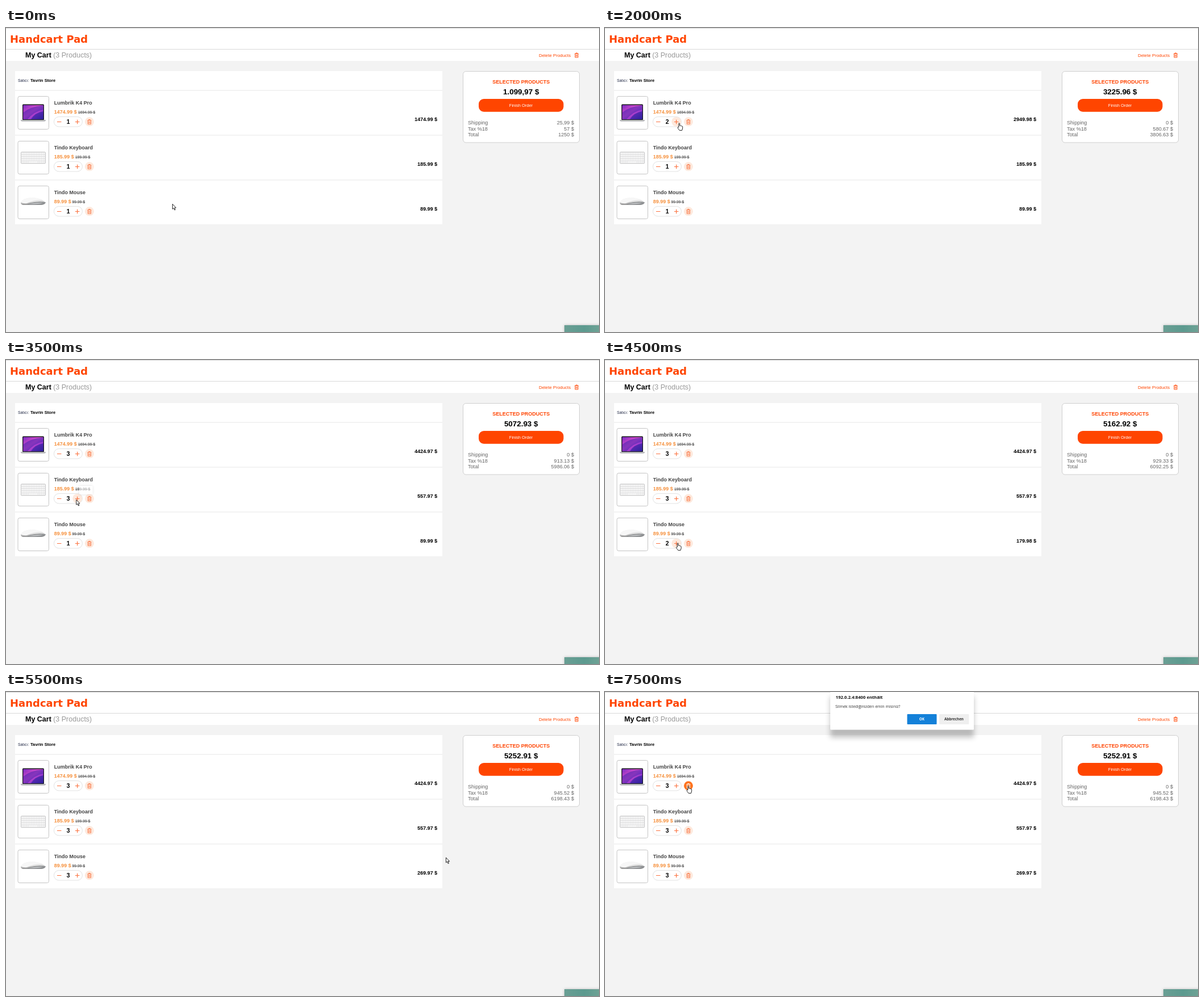
These frames come from a looping animation (1045x536 px, 8000 ms). An HTML page:

```html
<!DOCTYPE html>
<html lang="en">
<head>
<meta charset="utf-8">
<title>Shopping cart</title>
<style>
  html, body { margin: 0; width: 100%; height: 100%; overflow: hidden; background: #f3f3f3; }
  svg { display: block; width: 1045px; height: 536px; font-family: "Liberation Sans", Arial, sans-serif; }
  .bold { font-weight: 700; }
  .mid { text-anchor: middle; }
  .end { text-anchor: end; }
  .brand { font: 700 18px "DejaVu Sans", Verdana, sans-serif; }
  .dialog text { font-family: "Open Sans", "Noto Sans", sans-serif; }
  .old { text-decoration: line-through; }
  .line { fill: none; stroke-width: 1.2; }
</style>
</head>
<body>
<svg id="stage" viewBox="0 0 1045 536">
  <defs>
    <linearGradient id="screen" x1="0" y1="0" x2="1" y2="1">
      <stop offset="0" stop-color="#7a2bc4"/><stop offset=".45" stop-color="#e04fc8"/>
      <stop offset=".7" stop-color="#8a35cf"/><stop offset="1" stop-color="#2b2a9c"/>
    </linearGradient>
    <linearGradient id="shell" x1="0" y1="0" x2="0" y2="1">
      <stop offset="0" stop-color="#f4f4f4"/><stop offset=".6" stop-color="#dcdcdc"/><stop offset="1" stop-color="#8c8c8c"/>
    </linearGradient>
    <linearGradient id="teal">
      <stop offset="0" stop-color="#6a9f94"/><stop offset=".5" stop-color="#5c9a8f"/><stop offset="1" stop-color="#74a597"/>
    </linearGradient>
    <filter id="shade" x="-20%" y="-30%" width="140%" height="190%">
      <feDropShadow dx="0" dy="14" stdDeviation="5" flood-opacity=".24"/>
    </filter>
    <filter id="soft" x="-30%" y="-50%" width="160%" height="200%">
      <feDropShadow dx="0" dy="0" stdDeviation="2" flood-opacity=".25"/>
    </filter>
  </defs>
</svg>
<script>
const ORANGE = '#ff4500', PALE = '#fde9dd', ICON = '#fb7240';
const STEP = 500, LOOP = 8000, ROW_HEIGHT = 79;
const stage = document.getElementById('stage');

function add(parent, tag, attrs, content) {
  const node = document.createElementNS('http://www.w3.org/2000/svg', tag);
  for (const key in attrs) node.setAttribute(key, attrs[key]);
  if (content !== undefined) node.textContent = content;
  parent.appendChild(node);
  return node;
}
const rect = (parent, x, y, width, height, fill, more = {}) =>
  add(parent, 'rect', { x, y, width, height, fill, ...more });
const path = (parent, d, more = {}) => add(parent, 'path', { d, ...more });
const text = (parent, x, y, size, fill, content, style = '') =>
  add(parent, 'text', { x, y, fill, class: style, 'font-size': size }, content);
const group = (parent, transform = '', more = {}) => add(parent, 'g', { transform, ...more });
const show = (node, on) => node.setAttribute('visibility', on ? 'visible' : 'hidden');

function trash(parent, x, y, color) {
  return path(group(parent, `translate(${x} ${y})`),
    'M-3.5-2.6H3.5M-1.3-2.8V-4H1.3V-2.8M-2.6-2.4V3.9H2.6V-2.4M-.9-.8V2.4M.9-.8V2.4',
    { fill: 'none', stroke: color, 'stroke-width': .9 });
}

function drawLaptop(g) {
  rect(g, 29, 134.5, 38, 28, '#17171c', { rx: 1.5 });
  rect(g, 30.3, 136, 35.4, 25, 'url(#screen)');
  path(g, 'M30.3 149Q42 139 65.7 136V144Q50 147 38 161H30.3Z', { fill: '#4b26b4', opacity: .6 });
  path(g, 'M44 161Q51 149 65.7 147V161Z', { fill: '#31219c', opacity: .65 });
  path(g, 'M26 162H70V163.4Q69 164.8 67 164.8H29Q27 164.8 26 163.4Z', { fill: '#b7b8bb' });
}

function drawKeyboard(g) {
  rect(g, 26.3, 139.5, 43.4, 20.5, '#d5d5d6', { rx: 1.5, stroke: '#c2c2c2', 'stroke-width': .6 });
  for (let row = 0; row < 5; row++) {
    for (let col = 0; col < 14; col++) {
      const wide = row === 4 && col > 3 && col < 9;
      rect(g, 27.4 + col * 2.97, 140.6 + row * 3.8, wide ? 3 : 2.4, 3, '#fbfbfb');
    }
  }
}

function drawMouse(g) {
  path(g, 'M26 150Q29 142 44 141Q60 141 70 149.5Q69 153 62 154H30Q26 153 26 150Z', { fill: 'url(#shell)' });
  path(g, 'M26 149Q30 142 44 141Q57 141 64 145Q48 145 37 151Q30 152 26 149Z', { fill: '#f7f7f7' });
  path(g, 'M36 153.7Q43 149 57 148.4Q67 148.2 70 149.5Q68 154 60 154Z', { fill: '#8f9193' });
  path(g, 'M40 152.6Q50 149.5 65 150Q58 152.8 40 152.6Z', { fill: '#c4c6c8' });
}

const products = [
  { name: 'Lumbrik K4 Pro', price: 1474.99, old: 1694.99, oldX: 127, draw: drawLaptop },
  { name: 'Tindo Keyboard', price: 185.99, old: 199.99, oldX: 122, draw: drawKeyboard },
  { name: 'Tindo Mouse', price: 89.99, old: 99.99, oldX: 116.6, draw: drawMouse },
];
const money = value => value.toFixed(2) + ' $';

// Page header
rect(stage, 0, 0, 1045, 58, '#fff');
rect(stage, 0, 0, 1045, 1, '#d9d9d9');
rect(stage, 0, 37, 1045, 1, '#d9d9d9');
text(stage, 7, 26, 18, ORANGE, 'Handcart Pad', 'brand');
text(stage, 34, 52, 12.5, '#000', 'My Cart', 'bold');
text(stage, 83.2, 52, 12.5, '#999', '(3 Products)');
text(stage, 939, 51, 7.9, ORANGE, 'Delete Products');
trash(stage, 1005.5, 48, ORANGE);

// Product list
rect(stage, 16, 76, 753, 33, '#fff');
text(stage, 21, 95, 6.8, '#1c2340', 'Satıcı:');
text(stage, 43, 95, 7.7, '#000', 'Tavrin Store', 'bold');

const rows = products.map((product, i) => {
  const g = group(stage, `translate(0 ${i * ROW_HEIGHT})`);
  rect(g, 16, 111, 753, 77, '#fff');
  rect(g, 21, 120.5, 54.5, 58, '#fff', { rx: 3, stroke: '#c4c4c4' });
  product.draw(g);
  text(g, 84.7, 135.3, 9, '#444', product.name, 'bold');
  text(g, 84.7, 151, 9, '#f6923f', money(product.price), 'bold');
  text(g, product.oldX, 151, 6.8, '#444', money(product.old), 'old');
  rect(g, 84.5, 156.5, 50, 17.5, '#fff', { rx: 8.7, stroke: '#e2e2e2' });
  const plusHover = add(g, 'circle', { cx: 125.7, cy: 165.3, r: 8.4, fill: PALE });
  path(g, 'M90 165.5H97.5M122 165.5H129.5M125.7 161.7V169.3', { class: 'line', stroke: ICON });
  const quantity = text(g, 109.7, 169, 10.5, '#000', 1, 'bold mid');
  const bin = add(g, 'circle', { cx: 147, cy: 165.3, r: 8, fill: PALE });
  const binIcon = trash(g, 147, 165.5, ICON);
  const amount = text(g, 760, 164, 9, '#000', '', 'bold end');
  return { plusHover, quantity, bin, binIcon, amount };
});

// Summary card
rect(stage, 805.5, 76.5, 205, 125.5, '#fff', { rx: 5, stroke: '#cfcfcf' });
text(stage, 907.7, 98, 9, ORANGE, 'SELECTED PRODUCTS', 'bold mid');
const subtotal = text(stage, 907.7, 117.4, 13.4, '#000', '', 'bold mid');
rect(stage, 833, 125, 149.5, 22.7, ORANGE, { rx: 9 });
text(stage, 907.5, 139, 7.5, '#fff', 'Finish Order', 'mid');
const costs = ['Shipping', 'Tax %18', 'Total'].map((label, i) => {
  const y = 170.4 + i * 10.2;
  text(stage, 814, y, 9.1, '#666', label);
  return text(stage, 1001, y, 9.1, '#666', '', 'end');
});

rect(stage, 984, 524, 70, 20, 'url(#teal)', { filter: 'url(#soft)' });

const hint = rect(stage, 129, 222, 23.5, 15, '#fff', { rx: 1.5, opacity: .55, filter: 'url(#soft)' });

// Confirmation dialog
const dialog = group(stage, '', { class: 'dialog' });
rect(dialog, 397, -6, 253, 72.3, '#fff', { rx: 1.5, filter: 'url(#shade)' });
text(dialog, 406.5, 12.2, 7.7, '#111', '192.0.2.4:8400 enthält', 'bold');
text(dialog, 406, 28, 7, '#333', 'Silmek istediğinizden emin misiniz?');
rect(dialog, 532.5, 39, 52, 18, '#1481d9', { rx: 1 });
text(dialog, 558.3, 50.3, 6.3, '#fff', 'OK', 'bold mid');
rect(dialog, 589, 39, 52.3, 18, '#efefef', { rx: 1 });
text(dialog, 615, 50.3, 6.3, '#333', 'Abbrechen', 'bold mid');

// Pointer shapes
const pointer = group(stage, '', { stroke: '#111', 'stroke-width': .9, 'stroke-linejoin': 'round', fill: '#fff' });
const arrow = path(pointer, 'M.4.4V9.3L2.4 7.5L4 11L5.4 10.4L3.9 7H6.6Z');
const hand = path(pointer,
  'M2.4 8V1.4Q3.3 0 4.2 1.4V5.2Q5.4 4.3 6 5.5Q7.2 4.9 7.7 6.1Q9 5.7 9.2 7.2V10L8.1 13.6H3.8L.7 9.3Q.3 7.8 1.5 7.6Z');

// Pointer x, y, shape, hovered plus row (-1: none), quantities
const steps = [
  [293, 310, 'arrow', -1, '111'],
  [916, 175, 'arrow', -1, '111'],
  [128, 117, 'arrow', -1, '111'],
  [127.5, 169, 'hand', 0, '111'],
  [127.5, 167, 'hand', 0, '211'],
  [124, 198, 'arrow', -1, '311'],
  [123, 246, 'hand', 1, '311'],
  [123.5, 246, 'arrow', 1, '331'],
  [124, 317, 'arrow', 1, '331'],
  [125, 322, 'hand', 2, '332'],
  [125, 320, 'hand', 2, '333'],
  [775, 291.5, 'arrow', -1, '333'],
  [870.5, 175, 'arrow', -1, '333'],
  [673, 122, 'arrow', -1, '333'],
  [162, 164.5, 'arrow', -1, '333'],
  [143.5, 165, 'hand', -1, '333'],
];

function render(index) {
  const [x, y, shape, hovered, quantities] = steps[index];
  let sum = 0;
  rows.forEach((row, i) => {
    const amount = quantities[i] * products[i].price;
    sum += amount;
    row.quantity.textContent = quantities[i];
    row.amount.textContent = money(amount);
    show(row.plusHover, i === hovered);
  });

  const untouched = quantities === '111';
  const tax = sum * .18;
  const values = untouched ? ['25,99 $', '57 $', '1250 $'] : ['0 $', money(tax), money(sum + tax)];
  subtotal.textContent = untouched ? '1.099,97 $' : money(sum);
  costs.forEach((cost, i) => cost.textContent = values[i]);

  const confirming = index === steps.length - 1;
  rows[0].bin.setAttribute('fill', confirming ? '#ff7420' : PALE);
  rows[0].binIcon.setAttribute('stroke', confirming ? '#fff' : ICON);
  show(dialog, confirming);
  show(hint, index === 7);
  pointer.setAttribute('transform', `translate(${x} ${y})`);
  show(arrow, shape === 'arrow');
  show(hand, shape === 'hand');
}

const start = performance.now();
let current = -1;
function tick() {
  const index = Math.floor((performance.now() - start) % LOOP / STEP);
  if (index !== current) render(current = index);
  requestAnimationFrame(tick);
}
tick();
</script>
</body>
</html>
```
